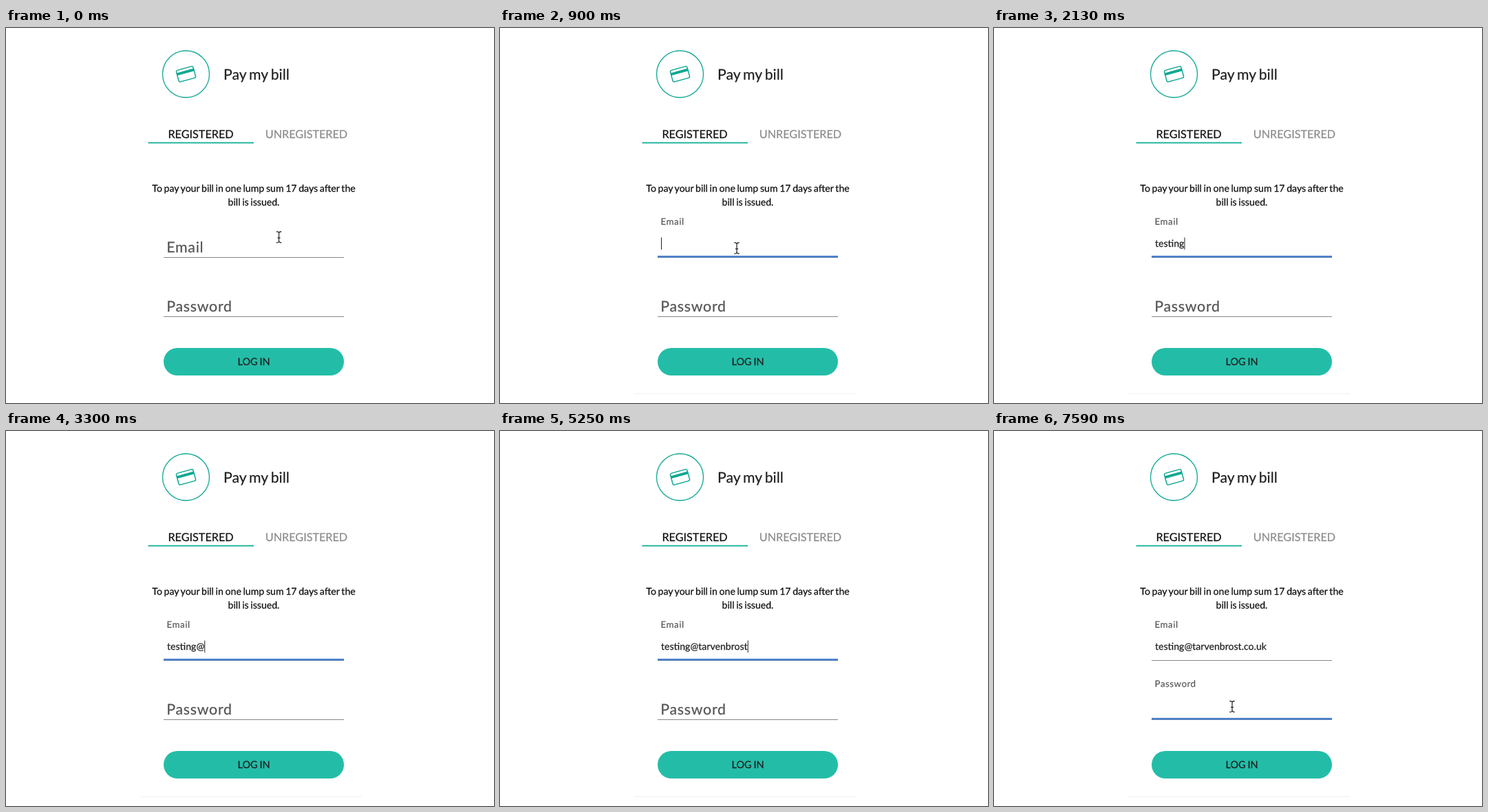
These frames come from a looping animation (709 by 545 pixels, 8000 ms). An HTML page:

```html
<!DOCTYPE html>
<html lang="en">
<head>
<meta charset="utf-8">
<title>Pay my bill</title>
<style>
  html, body { margin: 0; width: 100%; height: 100%; overflow: hidden; background: #fff; }
  svg { display: block; width: 709px; height: 545px; }
  text {
    font-family: Lato, "Open Sans", sans-serif;
    color: #222; fill: currentColor; stroke: currentColor; stroke-width: .25px;
    word-spacing: -.065em; text-rendering: geometricPrecision;
  }
  .mid { text-anchor: middle; }
  .title { font-size: 21.2px; }
  .tab { font-size: 16.2px; }
  .body { font-size: 14.1px; }
  .dark { color: #111; }
  .dim { color: #8c8c8c; }
  .label { font-size: 21.3px; letter-spacing: .75px; color: #555; }
  .rule { fill: #888; }
  .focus { fill: #4a80cb; }
  .icon { fill: none; stroke: #10a893; }
</style>
</head>
<body>
<svg viewBox="0 0 709 545">
  <defs>
    <path id="beam" d="M-3.2 -8Q0 -8 0 -5.6Q0 -8 3.2 -8M0 -5.6V5.6M-3.2 8Q0 8 0 5.6Q0 8 3.2 8M-1.5 1H1.5"/>
  </defs>

  <g class="icon">
    <circle cx="261.5" cy="67" r="34" stroke-width="1.3"/>
    <g transform="translate(261.5 67) rotate(-15.5)">
      <rect x="-12.7" y="-8.7" width="25.4" height="17.4" rx="2.4" stroke-width="1.5"/>
      <path d="M-12.5 -3.2H12.5" stroke-width="3.8"/>
    </g>
  </g>
  <text class="title" x="316" y="75">Pay my bill</text>

  <text class="tab mid dark" x="283" y="160.1">REGISTERED</text>
  <text class="tab mid dim" x="436.5" y="160.1">UNREGISTERED</text>
  <rect x="206.5" y="165.8" width="153.5" height="2" fill="#27b7a2"/>

  <text class="body mid dark" x="360" y="238.1">To pay your bill in one lump sum 17 days after the</text>
  <text class="body mid dark" x="360" y="258.1">bill is issued.</text>

  <g id="email">
    <rect class="rule" x="229" y="333" width="262" height="1"/>
    <rect class="focus" x="229" y="330.9" width="262" height="2.8"/>
    <text class="label">Email</text>
  </g>
  <g id="password">
    <rect class="rule" x="229" y="419" width="262" height="1"/>
    <rect class="focus" x="229" y="416.9" width="262" height="2.8"/>
    <text class="label">Password</text>
  </g>
  <text id="typed" class="body" x="234" y="318.1"></text>
  <rect id="caret" width="1" height="17.5" fill="#222"/>

  <rect x="229" y="465" width="262" height="40" rx="20" fill="#23bda7"/>
  <text class="mid" x="360" y="490.2" font-size="14.5">LOG IN</text>
  <rect id="edge" x="195" y="531" width="322" height="1" fill="#f1f1f1"/>

  <g id="pointer" fill="none" stroke-linecap="round">
    <use href="#beam" stroke="#fff" stroke-width="3"/>
    <use href="#beam" stroke="#333" stroke-width="1.3"/>
  </g>
</svg>
<script>
const LOOP = 8000;
const FLOAT = 150;
const EMAIL_CLICK = 660;
const PASSWORD_CLICK = 7080;
const BLINK = 510;
const ADDRESS = 'testing@tarvenbrost.co.uk';
const KEYS = [
  1440, 1560, 1650, 1740, 1830, 1950, 2100, 3300,
  3630, 3780, 3990, 4140, 4260, 4500, 4680, 4770, 4860, 4950, 5040,
  5280, 5370, 5490, 5670, 5820, 5970
];
// time, x, y
const PATH = [
  [0, 396.5, 304], [60, 396.5, 304], [600, 345, 318], [900, 344, 320],
  [6450, 344, 320], [6660, 334, 386.5], [7020, 346, 400.5], [8000, 346, 400.5]
];

const $ = id => document.getElementById(id);
const clamp = v => Math.max(0, Math.min(1, v));
const mix = (a, b, p) => a + (b - a) * p;
const ease = p => p * p * (3 - 2 * p);
const since = (t, start) => ease(clamp((t - start) / FLOAT));
const show = (el, on) => el.setAttribute('visibility', on ? 'visible' : 'hidden');

const typed = $('typed'), caret = $('caret'), pointer = $('pointer'), edge = $('edge');

function drawField(id, base, lift, focus) {
  const field = $(id);
  field.querySelector('.label').setAttribute('transform',
    `translate(${mix(233.3, 233.6, lift)} ${base - 40 * lift}) scale(${mix(1, 0.628, lift)})`);
  field.querySelector('.focus').setAttribute('opacity', focus);
}

function drawPointer(t) {
  const i = Math.max(1, PATH.findIndex(p => p[0] > t));
  const [t0, x0, y0] = PATH[i - 1], [t1, x1, y1] = PATH[i];
  const p = ease((t - t0) / (t1 - t0));
  pointer.setAttribute('transform', `translate(${mix(x0, x1, p)} ${mix(y0, y1, p)})`);
  show(pointer, t < KEYS[0] || t >= 6480);
}

function drawCaret(t, count) {
  const inPassword = t >= PASSWORD_CLICK;
  const last = inPassword ? PASSWORD_CLICK : count ? KEYS[count - 1] : EMAIL_CLICK;
  const width = count && !inPassword ? typed.getComputedTextLength() : 0;
  caret.setAttribute('x', 234 + width);
  caret.setAttribute('y', inPassword ? 390.5 : 304.5);
  show(caret, t >= last && (t - last) % (2 * BLINK) < BLINK);
}

function render(t) {
  const count = KEYS.filter(k => k <= t).length;
  const text = ADDRESS.slice(0, count);
  if (typed.textContent !== text) typed.textContent = text;

  const email = since(t, EMAIL_CLICK), password = since(t, PASSWORD_CLICK);
  drawField('email', 326, email, email * (1 - password));
  drawField('password', 412, password, password);
  drawCaret(t, count);
  drawPointer(t);
  show(edge, t >= 840);
}

const start = performance.now();
function tick() {
  render((performance.now() - start) % LOOP);
  requestAnimationFrame(tick);
}
tick();
</script>
</body>
</html>
```
